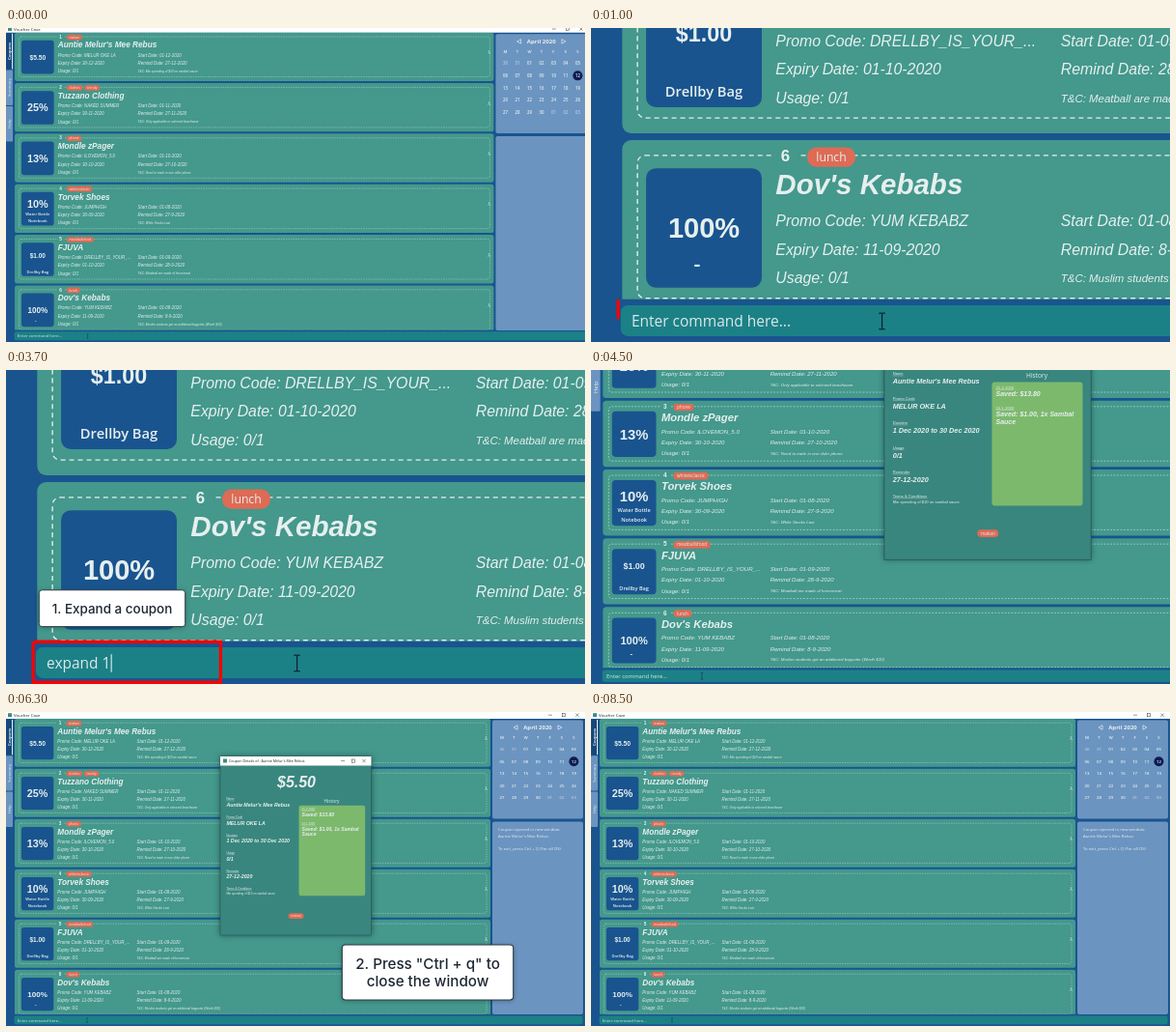
Write an HTML page with a canvas that moves like this. It is 600 px wide and 325 px high and loops after 9000 ms.

```html
<!DOCTYPE html>
<html lang="en">
<head>
<meta charset="utf-8">
<style>
html, body { margin: 0; width: 100%; height: 100%; overflow: hidden; background: #19548f; }
canvas { display: block; width: 600px; height: 325px; }
</style>
</head>
<body>
<canvas id="stage" width="600" height="325"></canvas>
<script>
const ctx = document.getElementById('stage').getContext('2d');
const LOOP = 9000, ZOOM = 3.59, SUBMIT = 3800, CLOSE = 7800;
const BLUE = '#19548f', TEAL = '#44988c', PANEL = '#6c94c0', TAG = '#de6b55', WHITE = '#e6efee';
const ARIAL = '"Liberation Sans", Arial, sans-serif';
const UI = '"Open Sans", "Noto Sans", sans-serif';
const SHOP = "Auntie Melur's Mee Rebus";

const cards = [
  { name: SHOP, save: '$5.50', size: 6.7, code: 'MELUR OKE LA', start: '01-12-2020', end: '30-12-2020',
    remind: '27-12-2020', terms: 'Min spending of $10 on sambal sauce', tags: ['makan'] },
  { name: 'Tuzzano Clothing', save: '25%', size: 10.8, code: 'NAKED SUMMER', start: '01-11-2020', end: '30-11-2020',
    remind: '27-11-2020', terms: 'Only applicable to selected beachwear', tags: ['clothes', 'trendy'] },
  { name: 'Mondle zPager', save: '13%', size: 10.8, code: 'ILOVEMON_5.0', start: '01-10-2020', end: '30-10-2020',
    remind: '27-10-2020', terms: 'Need to trade in one older phone', tags: ['phone'] },
  { name: 'Torvek Shoes', save: '10%', size: 10.8, y: 20.2, extra: ['Water Bottle', 'Notebook'], code: 'JUMPHIGH',
    start: '01-08-2020', end: '30-09-2020', remind: '27-9-2020', terms: 'While Stocks Last', tags: ['whiteisclassic'] },
  { name: 'FJUVA', save: '$1.00', size: 6.5, y: 21.1, extra: ['Drellby Bag'], code: 'DRELLBY_IS_YOUR_...',
    start: '01-09-2020', end: '01-10-2020', remind: '28-9-2020', terms: 'Meatball are made of horsemeat', tags: ['meatballsfood'] },
  { name: "Dov's Kebabs", save: '100%', size: 8.1, extra: ['-'], code: 'YUM KEBABZ', start: '01-08-2020', end: '11-09-2020',
    remind: '8-9-2020', terms: 'Muslim students get an additional baguette (Worth $10)', tags: ['lunch'] }
];

const clamp = v => Math.max(0, Math.min(1, v));
const ease = v => (v = clamp(v)) < .5 ? 4 * v ** 3 : 1 - 4 * (1 - v) ** 3;

function box(x, y, w, h, r, color) {
  ctx.fillStyle = color;
  ctx.beginPath();
  ctx.roundRect(x, y, w, h, r);
  ctx.fill();
}

function text(str, x, y, size, style = '', family = UI, align = 'left', color = WHITE) {
  ctx.font = `${style} ${size}px ${family}`;
  ctx.textAlign = align;
  ctx.fillStyle = color;
  ctx.fillText(str, x, y);
}

function line(color, width, ...pts) {
  ctx.strokeStyle = color;
  ctx.lineWidth = width;
  ctx.beginPath();
  pts.forEach(([x, y]) => ctx.lineTo(x, y));
  ctx.stroke();
}

function tag(str, x, y) {
  ctx.font = `3.4px ${UI}`;
  const w = ctx.measureText(str).width + 5.2;
  box(x, y, w, 5.6, 2.6, TAG);
  text(str, x + 2.6, y + 4, 3.4);
  return w;
}

function controls(x, y, gap) {
  const dark = '#333';
  line(dark, .5, [x - 2, y], [x + 2, y]);
  ctx.strokeRect(x + gap - 1.6, y - 1.6, 3.2, 3.2);
  const c = x + 2 * gap;
  line(dark, .5, [c - 1.7, y - 1.7], [c + 1.7, y + 1.7]);
  line(dark, .5, [c - 1.7, y + 1.7], [c + 1.7, y - 1.7]);
}

function drawCard(card, i) {
  const top = 6.8 + 52 * i;
  box(9, top, 493, 50, 2.6, TEAL);
  ctx.strokeStyle = WHITE;
  ctx.lineWidth = .38;
  ctx.setLineDash([1.4, 1.1]);
  ctx.beginPath();
  ctx.roundRect(13.4, top + 4.4, 484.6, 41.2, 2.2);
  ctx.stroke();
  ctx.setLineDash([]);
  box(53, top + 2, 7, 5, 0, TEAL);
  text(i + 1, 56.1, top + 6.1, 4.7, 'bold', ARIAL, 'center');
  let x = 62.4;
  for (const t of card.tags) x += tag(t, x, top + 2.1) + 2;

  box(15.9, top + 8.1, 33.4, 34.4, 2.8, BLUE);
  text(card.save, 32.6, top + (card.y || 25.3) + card.size * .36, card.size, 'bold', ARIAL, 'center');
  const extra = card.extra || [];
  extra.forEach((s, n) =>
    text(s, s === '-' ? 30.6 : 32.6, top + (s === '-' ? 38 : 39.4) - 7 * (extra.length - 1 - n), s === '-' ? 6 : 4.1, '600', UI, 'center'));

  text(card.name, 53.3, top + 15.7, 8.22, 'italic bold', ARIAL);
  const row = (s, x, y) => text(s, x, top + y, 4.41, 'italic', ARIAL);
  row('Promo Code: ' + card.code, 53.3, 24.9);
  row('Expiry Date: ' + card.end, 53.3, 33.1);
  row('Usage: 0/1', 53.3, 41.3);
  row('Start Date: ' + card.start, 135.6, 24.9);
  row('Remind Date: ' + card.remind, 135.6, 33.1);
  text('T&C: ' + card.terms, 135.6, top + 41, 3.2, 'italic', ARIAL);
  text('λ', 497.5, top + 22.5, 4.8, '', UI, 'center');
}

function drawCalendar() {
  box(504, 8.5, 94, 102, 2, PANEL);
  text('April 2020', 551, 18.2, 6, 'bold', UI, 'center');
  line(WHITE, .7, [530, 13.8], [526, 16], [530, 18.2], [530, 13.8]);
  line(WHITE, .7, [572, 13.8], [576, 16], [572, 18.2], [572, 13.8]);
  for (let i = 0; i < 7; i++) text('MTWTFSS'[i], 514 + 12.4 * i, 28.3, 4.2, '600', UI, 'center');
  for (let i = 0; i < 35; i++) {
    const x = 514 + 12.4 * (i % 7), y = 38.7 + 12.5 * Math.floor(i / 7);
    const day = i < 2 ? 30 + i : (i - 2) % 30 + 1;
    if (i === 13) box(x - 5, y - 5, 10, 10, 5, '#0d1c50');
    text(String(day).padStart(2, '0'), x, y + 1.6, 4.3, '600', UI, 'center',
      i < 2 || i > 31 ? '#b9cbe1' : WHITE);
  }
}

function drawTabs() {
  ['Coupons', 'Summary', 'Help'].forEach((s, i) => {
    const y = 8 + 37.3 * i;
    box(0, y, 7, 36.3, 1, i ? PANEL : '#17477c');
    if (!i) box(6, y, 1, 36.3, 0, WHITE);
    ctx.save();
    ctx.translate(4.8, y + 18);
    ctx.rotate(-Math.PI / 2);
    text(s, 0, 0, 4.2, i ? '' : 'bold', UI, 'center');
    ctx.restore();
  });
}

function drawInput(t) {
  box(8.6, 314.4, 589, 8.9, 2, '#1c8186');
  let typed = '';
  if (t < SUBMIT) typed = 'expand 1'.slice(0, clamp((t - 1200) / 600) * 6 + (t >= 2300) + (t >= 2500));
  text(typed || 'Enter command here...', 11.7, 320.5, 4.32, '', UI, 'left', '#dbe8e8');
  if (typed) {
    const x = 11.9 + ctx.measureText(typed).width;
    line(WHITE, .3, [x, 316.4], [x, 321.6]);
  }
  line('#0b2430', .35, [84, 316.8], [84, 321.2]);
  for (const y of [316.7, 321.3]) line('#0b2430', .35, [83.1, y], [84.9, y]);
}

function label(s, x, y) {
  text(s, x, y, 3, '', ARIAL);
  line(WHITE, .25, [x, y + .5], [x + ctx.measureText(s).width, y + .5]);
}

function drawPopup() {
  const value = (s, x, y, size = 5.3) => text(s, x, y, size, 'italic bold', ARIAL);
  ctx.save();
  ctx.shadowColor = 'rgba(0,0,0,.45)';
  ctx.shadowBlur = 6;
  box(222, 46, 156.5, 185, 0, '#39867e');
  ctx.restore();
  ctx.strokeStyle = '#25585a';
  ctx.lineWidth = .6;
  ctx.strokeRect(222, 46, 156.5, 185);
  box(222, 46, 156.5, 9.5, 0, '#fff');
  box(225, 48.5, 4, 4, 0, '#3f8c80');
  text('Coupon Details of : ' + SHOP, 231, 52.2, 3.7, '', UI, 'left', '#222');
  controls(349, 50.6, 11);
  text('$5.50', 301, 77.8, 16, 'italic bold', ARIAL, 'center');
  [['Name', SHOP], ['Promo Code', 'MELUR OKE LA'], ['Duration', '1 Dec 2020 to 30 Dec 2020'],
   ['Usage', '0/1'], ['Reminder', '27-12-2020']].forEach(([k, v], i) => {
    label(k, 228.4, 91.4 + 18.6 * i);
    value(v, 228.4, 97.9 + 18.6 * i);
  });
  label('Terms & Conditions', 228.4, 184);
  text('Min spending of $10 on sambal sauce', 228.4, 188.6, 3, '', ARIAL);
  text('History', 337.5, 93.6, 4.8, '', UI, 'center');
  box(303.5, 96.7, 68.7, 93.5, 2.2, '#7cb96d');
  label('25-2-2020', 306.5, 102);
  value('Saved: $13.80', 306.5, 107.5, 5.1);
  label('24-1-2020', 306.5, 117.3);
  value('Saved: $1.00, 1x Sambal', 306.5, 122.6, 5.1);
  value('Sauce', 306.5, 128.4, 5.1);
  tag('makan', 292.5, 208.3);
}

function drawApp(t) {
  box(0, 0, 600, 7, 0, '#fff');
  box(2, 1.2, 4, 4, 0, '#3f8c80');
  text('Voucher Cave', 8, 4.9, 4.3, '', UI, 'left', '#222');
  controls(564, 3.2, 14);
  drawTabs();
  ctx.save();
  ctx.beginPath();
  ctx.rect(8, 6.8, 496, 305.9);
  ctx.clip();
  cards.forEach(drawCard);
  ctx.restore();
  drawCalendar();
  box(504, 113.5, 94, 199.5, 2, PANEL);
  if (t >= SUBMIT)
    ['Coupon opened in new window:', SHOP, '', 'To exit, press Ctrl + Q (For all OS)'].forEach((s, i) =>
      text(s, 510, 123 + 6.5 * i, 4.3));
  drawInput(t);
  if (t >= SUBMIT && t < CLOSE) drawPopup();
}

// Springs in at `from`, fades while shrinking at `to`.
function callout(t, from, to, cx, cy, w, h, size, gap, lines) {
  const s = (t - from) / 1000, out = clamp((t - to) / 200);
  if (s <= 0 || out === 1) return;
  const scale = (1 - Math.exp(-2.5 * s) * Math.cos(11.35 * s)) * (1 - out);
  ctx.save();
  ctx.globalAlpha = 1 - out;
  ctx.translate(cx, cy);
  ctx.scale(scale, scale);
  ctx.save();
  ctx.shadowColor = 'rgba(0,0,0,.3)';
  ctx.shadowBlur = 5;
  ctx.shadowOffsetY = 1;
  box(-w / 2, -h / 2, w, h, 3, '#fff');
  ctx.restore();
  ctx.strokeStyle = '#2c3b48';
  ctx.lineWidth = 1;
  ctx.stroke();
  lines.forEach((l, i) =>
    text(l, 0, size * .36 + gap * (i - (lines.length - 1) / 2), size, '500', 'Inter, sans-serif', 'center', '#1d2733'));
  ctx.restore();
}

function drawFrameMark(t) {
  const p = clamp((t - 970) / 730), alpha = 1 - clamp((t - 3750) / 200);
  if (!p || !alpha) return;
  ctx.save();
  ctx.globalAlpha = alpha;
  ctx.setLineDash([472 * p, 472]);
  line('#f20505', 3.4, [28.2, 281], [28.2, 323.3], [222.4, 323.3], [222.4, 281.2], [26.5, 281.2]);
  ctx.restore();
}

function draw(now) {
  const t = now % LOOP;
  const k = 1 + (ZOOM - 1) * (ease((t + 86) / 1000) - ease((t - 3830) / 1000));
  ctx.setTransform(1, 0, 0, 1, 0, 0);
  box(0, 0, 600, 325, 0, BLUE);
  ctx.setTransform(k, 0, 0, k, 0, 325 * (1 - k));
  drawApp(t);
  ctx.setTransform(1, 0, 0, 1, 0, 0);
  drawFrameMark(t);
  callout(t, 1505, 3750, 110, 246.7, 152, 38, 13.5, 0, ['1. Expand a coupon']);
  callout(t, 5450, CLOSE, 437, 269.5, 159, 51, 13.6, 16.6, ['2. Press "Ctrl + q" to', 'close the window']);
}

const began = performance.now();
function tick() {
  draw(performance.now() - began);
  requestAnimationFrame(tick);
}
tick();
</script>
</body>
</html>
```
